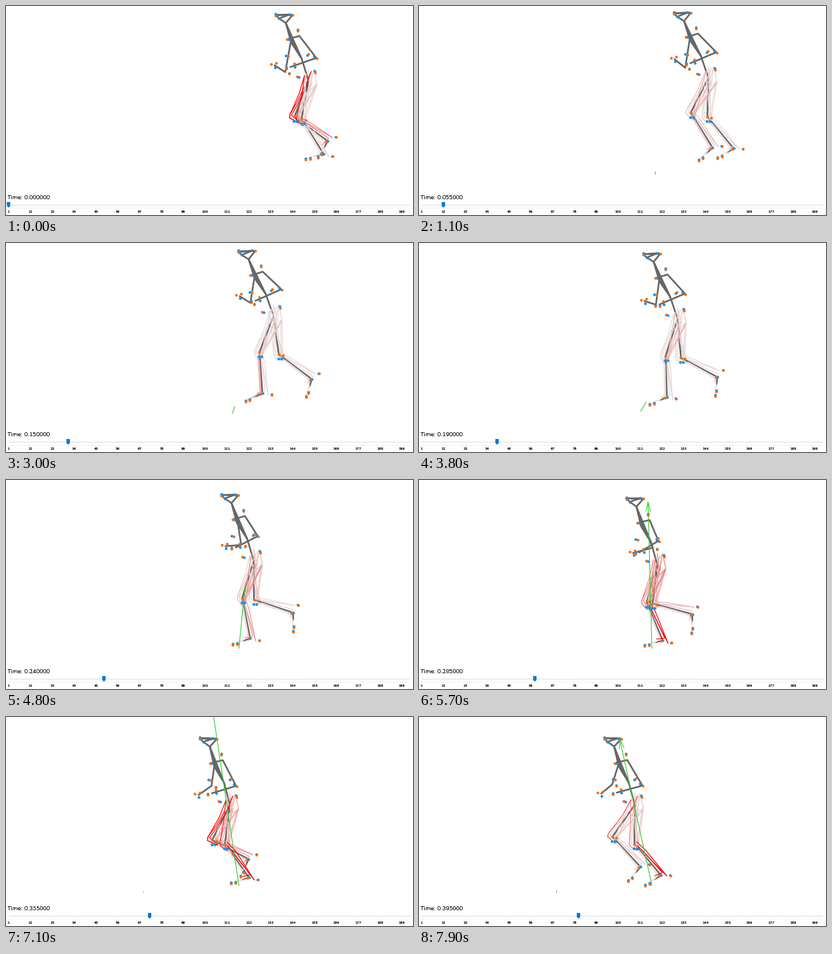
Recreate the animation shown at these times as a matplotlib script. Size 720 px wide and 370 px high, loop 8 s.

```python
import numpy as np
import matplotlib.pyplot as plt
from matplotlib.animation import FuncAnimation
from matplotlib.collections import LineCollection
from matplotlib.patches import Polygon

W, H, DPI = 720, 370, 100
PX = 72 / DPI
FRAMES = 80

BONE, BLUE, ORANGE = "#666666", "#0094ff", "#ff6a00"
GREEN, THUMB = "#32cd32", "#0078d7"

# Resting offsets from the pelvis
TORSO = dict(
    face=(-58, -116), chin=(-52, -110), crown=(-33, -117), nape=(-28, -116),
    neck=(-40, -102), waist=(-12, -39), sl=(-30, -75), sr=(-16, -79),
    top=(-19, -89), upl=(-38, -44), upr=(-1, -46))

# One stride: segment angles from straight down, positive backwards
PHASE = [0, 11, 23, 38, 57, 73, 90, 105, 124, 138, 146]
THIGH = [-21, -27, -24, -18, -16, -6, 8, 5, -7, -27, -35]
SHANK = [54, 32, 11, 2, 23, 37, 46, 62, 75, 62, 43]
FOOT = [-31, -48, -63, -67, -74, -70, -31, -7, -2, -26, -41]
LAG = 67

# Activation pulses per leg: (centre, width, peak)
PULSES = [
    dict(quad=[(0, 6, 1), (62, 11, .5)], flex=[(0, 7, 1), (68, 11, .9)],
         ham=[(11, 14, .2), (56, 19, .4)], glute=[(60, 12, .35)],
         calf=[(0, 9, .4), (70, 16, 1.8)], shin=[(23, 8, .7)]),
    dict(quad=[(70, 5, .9)], flex=[(0, 6, .9), (72, 10, 1)],
         ham=[(62, 17, .2)], glute=[(62, 12, .25)],
         calf=[(66, 9, .4)], shin=[]),
]

# Path points: o = offset from pelvis; t, s, f = (along, across) thigh, shank, foot;
# h = offset from heel
KNEECAP = [("t", .99, 9), ("t", 1.07, 7), ("s", .17, 4)]
MUSCLES = [
    ("flex", [("o", -7, -9), ("t", .39, 7)] + KNEECAP),
    ("quad", [("t", .2, 3), ("t", .6, 5)] + KNEECAP),
    ("quad", [("t", .3, 1), ("t", .7, 3), ("t", .98, 6), ("s", .17, 3)]),
    ("flex", [("o", 5, -16), ("o", -3, 4), ("t", .16, -1)]),
    ("ham", [("o", -4, -12), ("t", .9, -3), ("s", .1, 2)]),
    ("ham", [("o", 15, 8), ("s", .08, -4)]),
    ("ham", [("o", 13, 10), ("t", .92, -5), ("s", .15, -3)]),
    ("ham", [("t", .5, -2), ("s", .12, -3)]),
    ("ham", [("o", 3, 8), ("t", .97, -5), ("s", .12, 0)]),
    ("glute", [("o", 10, -17), ("o", 15, 6), ("t", .35, -4)]),
    ("glute", [("o", 9, -20), ("t", .12, -6)]),
    ("glute", [("o", 0, -20), ("t", .12, -5)]),
    ("glute", [("o", 6, 6), ("t", .6, -1)]),
    ("calf", [("t", .95, -4), ("s", .3, -8), ("h", -6, 1)]),
    ("calf", [("s", .08, -2), ("h", -6, 1)]),
    ("calf", [("s", .22, -3), ("s", .97, -5), ("f", .3, 5)]),
    ("shin", [("s", .15, 3), ("s", .95, 4), ("f", .5, -1)]),
    ("shin", [("s", .2, 1), ("s", .97, 2), ("f", .9, 0)]),
]

# Marker offsets (point, dx, dy)
BLUES = [("face", 0, -2), ("chin", 0, 0), ("crown", -1, 0), ("top", 0, -1), ("sl", -5, 2),
         ("upl", -2, 0), ("upr", -1, 1), ("er", -4, -3), ("hr", 8, 0), ("hr", -7, 1),
         ("hl", 1, 4), ("el", 7, 2), ("pelvis", -17, -6), ("pelvis", 11, -17)]
ORANGES = [("face", 0, 1), ("nape", 0, 0), ("top", 0, 1), ("sl", -8, 2), ("upl", 2, 1),
           ("upr", 1, -1), ("er", 1, 1), ("hr", 7, -6), ("hr", -7, 3), ("hl", -6, -2),
           ("hl", 3, -4), ("el", 7, 3), ("pelvis", -20, -7), ("pelvis", 12, -14)]


def smooth(x, xs, vs):
    """Cubic Hermite curve through key points."""
    m = np.gradient(vs, xs)
    k = min(np.searchsorted(xs, x, side="right"), len(xs) - 1) - 1
    h = xs[k + 1] - xs[k]
    s = (x - xs[k]) / h
    return ((2 * s**3 - 3 * s**2 + 1) * vs[k] + (s**3 - 2 * s**2 + s) * h * m[k]
            + (3 * s**2 - 2 * s**3) * vs[k + 1] + (s**3 - s**2) * h * m[k + 1])


def polar(length, deg):
    a = np.radians(deg)
    return length * np.array([np.sin(a), np.cos(a)])


def pulse(x, centre, width, power=2):
    return np.exp(-np.abs((x - centre) / width) ** power)


def pose_body(i):
    wave = np.sin(2 * np.pi * i / 92)
    swing = pulse(i, 57, 12)
    hip = np.array([535 - 1.95 * i - 3.5 * np.sin(2 * np.pi * i / 148),
                    132 + .2 * i - 10 * wave])
    a = np.radians(2.5 * wave)
    lean = np.array([[np.cos(a), np.sin(a)], [-np.sin(a), np.cos(a)]])
    b = {k: hip + lean @ np.array(v) for k, v in TORSO.items()}
    b["pelvis"] = hip
    b["el"] = hip + (-41 + 33 * swing, -15 - .27 * i)
    b["hl"] = hip + (-60 + 17 * swing, -27 - 9 * wave)
    b["er"] = hip + (14 - 12 * swing, -40 - 8 * wave - 8 * swing)
    b["hr"] = hip + (-32, -24 - 3 * wave)
    return b


def pose_leg(hip, phase):
    thigh, shank, foot = (smooth(phase, PHASE, a) for a in (THIGH, SHANK, FOOT))
    knee = hip + polar(69, thigh)
    ankle = knee + polar(73, shank)
    toe = ankle + polar(33, foot)
    heel = ankle + polar(16, foot + 149)
    return dict(knee=knee, ankle=ankle, toe=toe, heel=heel,
                ball=toe + .17 * (heel - toe))


def local(a, b, u, v):
    d = b - a
    return a + u * d + v * np.array([-d[1], d[0]]) / np.hypot(*d)


def muscle_path(points, hip, leg):
    axes = dict(t=(hip, leg["knee"]), s=(leg["knee"], leg["ankle"]),
                f=(leg["ankle"], leg["toe"]))
    base = dict(o=hip, h=leg["heel"])
    return np.array([local(*axes[k], u, v) if k in axes else base[k] + (u, v)
                     for k, u, v in points])


def tint(level):
    rest, full = np.array([.9, .89, .89]), np.array([1, 0, 0])
    return rest + (full - rest) * np.clip(level, 0, 1)


def skeleton(b, legs):
    mid = b["neck"] + .55 * (b["waist"] - b["neck"])
    out = [
        [b["face"], b["crown"], b["nape"], b["neck"], b["chin"], b["face"], b["nape"]],
        [b["chin"], b["crown"]],
        [b["waist"], b["pelvis"]],
        [b["sl"] + (-5, 1), b["sl"], b["sr"], b["er"], b["hr"]],
        [b["sl"], b["el"], b["hl"]],
    ]
    out += [[b["neck"], mid + (dx, 0), b["waist"]] for dx in (-6, -3, 0)]
    for leg in legs:
        foot = leg["ankle"] + .38 * (leg["toe"] - leg["ankle"])
        out.append([b["pelvis"], leg["knee"], leg["ankle"], foot])
    return [np.array(p) for p in out]


def force(i):
    """Ground reaction arrow, plus the mark left by the second plate."""
    size = max(.5, .4 * i, 340 * pulse(i, 68, 18.9, 2.4))
    base = np.array([np.interp(i, [0, 11, 23, 38, 48], [407, 418, 408, 392, 412]),
                     298 + 10 * pulse(i, 24, 6)])
    tilt = np.interp(i, [0, 23, 38, 48, 54, 79], [0, .1, .6, .1, 0, -.22])
    v = size * np.array([tilt, -1])
    tip, side = base + v, np.array([-v[1], v[0]])
    segs = [np.array([base, tip])]
    if size > 30:
        segs.append(np.array([tip - .062 * v + .016 * side, tip,
                              tip - .062 * v - .016 * side]))
    if i >= 38:
        segs.append(np.array([(243, 310), (243, 309.8 - 3 * pulse(i, 79, 8))]))
    return segs


fig = plt.figure(figsize=(W / DPI, H / DPI), dpi=DPI, facecolor="white")
ax = fig.add_axes([0, 0, 1, 1])
ax.set(xlim=(0, W), ylim=(H, 0))
ax.axis("off")


def lines(width, color, z):
    c = LineCollection([], linewidths=width * PX, colors=color, zorder=z, capstyle="round")
    return ax.add_collection(c)


bones = lines(3, BONE, 2)
tissue = lines(1.4, "k", 3)
arrow = lines(1.3, GREEN, 4)
dots = [ax.scatter([], [], s=(4.8 * PX) ** 2, c=c, linewidths=0, zorder=5)
        for c in (BLUE, ORANGE)]
clock = ax.text(3.5, 342.5, "", fontsize=9.5 * PX, va="baseline", antialiased=False)

# Slider
STEP = 696 / 198
ax.plot([5, 714], [351.5, 351.5], color="#d6d6d6", lw=PX)
for k in range(202):
    x = 4.5 + k * STEP
    ax.plot([x, x], [357, 358], color="#dddddd", lw=.8 * PX)
for k in range(1, 200, 11):
    ax.text(4.5 + (k - 1) * STEP, 366.3, str(k), fontsize=5.4 * PX, weight="bold",
            ha="center", va="baseline")
SHAPE = np.array([(-3, 347), (3, 347), (3, 354), (0, 357), (-3, 354)], float)
thumb = ax.add_patch(Polygon(SHAPE, fc=THUMB, lw=0, zorder=6))


def draw(i):
    b = pose_body(i)
    legs = [pose_leg(b["pelvis"], i), pose_leg(b["pelvis"], i + LAG)]
    bones.set_segments(skeleton(b, legs))

    strands = []
    for leg, pulses in zip(legs, PULSES):
        for group, pts in MUSCLES:
            level = .05 + sum(peak * pulse(i, c, w) for c, w, peak in pulses[group])
            strands.append((level, muscle_path(pts, b["pelvis"], leg)))
    strands.sort(key=lambda s: s[0])
    tissue.set_segments([p for _, p in strands])
    tissue.set_color([tint(a) for a, _ in strands])

    blue = [b[n] + (dx, dy) for n, dx, dy in BLUES]
    orange = [b[n] + (dx, dy) for n, dx, dy in ORANGES]
    for leg in legs:
        blue += [leg["knee"] + (-1, 8), leg["knee"] + (4, 8), leg["ankle"],
                 leg["heel"], leg["toe"] + (0, -1), leg["ball"] + (0, -1)]
        orange += [leg["knee"], leg["ankle"] + (-3, 1), leg["heel"] + (.5, .5),
                   leg["toe"] + (0, 1), leg["ball"] + (0, 1)]
    orange.append(legs[1]["knee"] + (7, 2))
    dots[0].set_offsets(blue)
    dots[1].set_offsets(orange)

    arrow.set_segments(force(i))
    clock.set_text(f"Time: {i * .005:.6f}")
    thumb.set_xy(SHAPE + (4.5 + i * STEP, 0))
    return [bones, tissue, arrow, *dots, clock, thumb]


anim = FuncAnimation(fig, draw, frames=FRAMES, interval=100, repeat=True,
                     repeat_delay=0, blit=False)
plt.show()
```
